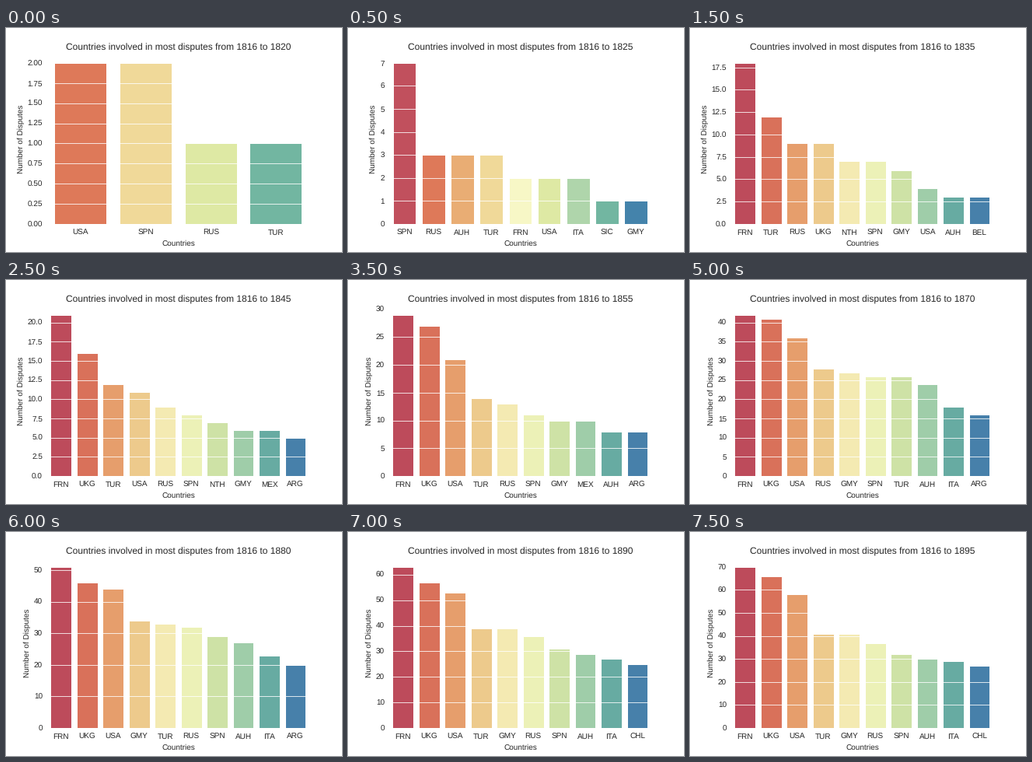
Animation of 432x288 px, one loop 8 s. Source, as a matplotlib script:

```python
import colorsys

import matplotlib.pyplot as plt
import numpy as np
from matplotlib.animation import FuncAnimation

plt.rcParams.update({
    "font.family": "Liberation Sans",
    "font.size": 10,
    "text.hinting": "none",
    "axes.titlesize": 12,
    "axes.grid": True,
    "axes.grid.axis": "y",
    "axes.axisbelow": False,
    "grid.color": "white",
    "grid.linewidth": 0.8,
    "xtick.bottom": False,
    "ytick.left": False,
    "figure.subplot.bottom": 0.125,
})
for key in ("text.color", "axes.labelcolor", "xtick.color", "ytick.color"):
    plt.rcParams[key] = ".15"
for side in ("left", "right", "top", "bottom"):
    plt.rcParams[f"axes.spines.{side}"] = False

FIRST, STEP, FRAMES, TOP = 1820, 5, 16, 10

# A few turning points per country, joined by power curves.
KEYS = (1820, 1825, 1835, 1865, 1895)
OPENING = {"USA": 2, "SPN": 2, "RUS": 1, "TUR": 1}
TOTALS = {  # in order of preference for ties; the last total holds
    "FRN": (2, 18, 40, 70),
    "USA": (2, 4, 33, 58),
    "ITA": (2, 2, 12, 29),
    "NTH": (0, 7),
    "SPN": (7, 7, 22, 32),
    "RUS": (3, 9, 23, 37),
    "UKG": (0, 9, 41, 66),
    "AUH": (3, 3, 21, 30),
    "BEL": (0, 3),
    "TUR": (3, 12, 18, 41),
    "SIC": (1,),
    "GMY": (1, 6, 20, 41),
    "MEX": (0, 0, 13, 18),
    "ARG": (0, 0, 11, 25),
    "CHL": (0, 0, 3, 27),
}
# Powers of the last two stretches: late starters, early starters, leaders.
LATE, EARLY = (3.05, 0.58), (0.7, 0.58)
PACE = {"FRN": (1.8, 1.4), "UKG": (1.4, 2.3), "USA": (1.3, 1.2),
        "MEX": EARLY, "ARG": EARLY, "CHL": EARLY}


def total(name, year):
    points = [OPENING.get(name, 0), *TOTALS[name]]
    points += points[-1:] * (len(KEYS) - len(points))
    powers = (1, 1, *PACE.get(name, LATE))
    i = min(np.searchsorted(KEYS, year, "right"), len(KEYS) - 1) - 1
    t = (year - KEYS[i]) / (KEYS[i + 1] - KEYS[i])
    return int(points[i] + (points[i + 1] - points[i]) * t ** powers[i] + 0.5)


def ranking(year):
    counts = [(name, total(name, year)) for name in TOTALS]
    counts = [c for c in counts if c[1] > 0]
    return sorted(counts, key=lambda c: -c[1])[:TOP]


def muted(color, amount=0.75):
    h, l, s = colorsys.rgb_to_hls(*color[:3])
    return colorsys.hls_to_rgb(h, l, s * amount)


def palette(n):
    stops = np.linspace(0, 1, n + 2)[1:-1]
    return [muted(c) for c in plt.get_cmap("Spectral")(stops)]


fig, ax = plt.subplots(figsize=(6, 4), dpi=72, facecolor="white")


def draw(i):
    year = FIRST + STEP * i
    names, values = zip(*ranking(year))
    n = len(names)
    ax.clear()
    ax.bar(range(n), values, width=0.8, color=palette(n),
           edgecolor="white", linewidth=1)
    ax.set_xticks(range(n), names)
    ax.set_xlim(-0.5, n - 0.5)
    ax.set_ylim(0, values[0] * 1.05)
    ax.set_xlabel("Countries")
    ax.set_ylabel("Number of Disputes")
    ax.set_title(f"Countries involved in most disputes from 1816 to {year}")
    return []


anim = FuncAnimation(fig, draw, frames=FRAMES, init_func=lambda: draw(0),
                     interval=500, repeat=True, repeat_delay=0)
plt.show()
```
